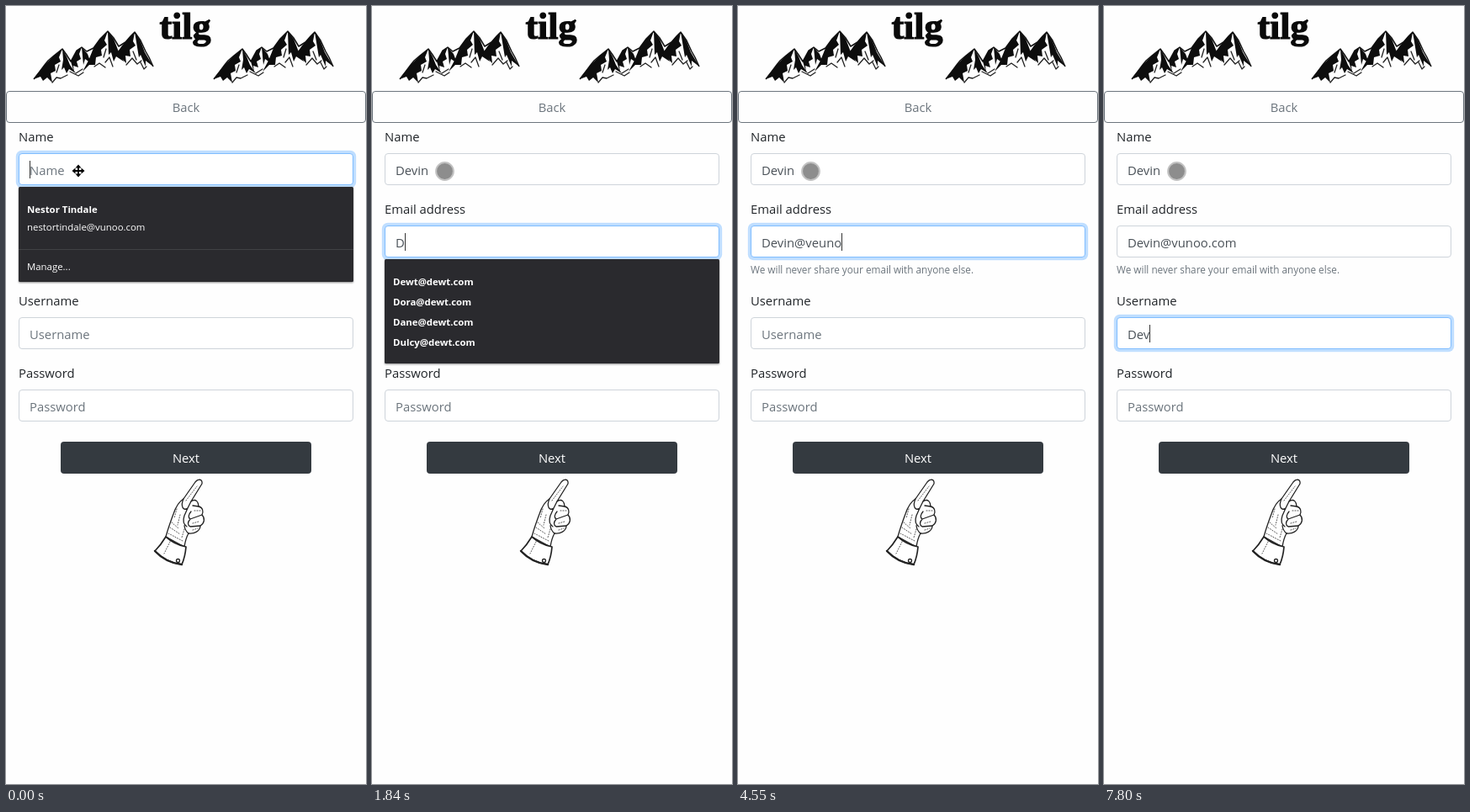
An HTML page that plays this animation: 428 by 925 pixels, repeating every 8 s.

```html
<!DOCTYPE html>
<html lang="en">
<head>
<meta charset="utf-8">
<title>Sign-up form</title>
<style>
  html, body { margin: 0; width: 100%; height: 100%; overflow: hidden; background: #fefefe; }
  svg { display: block; width: 100%; height: 100%; }
  text { font: 14.8px "Open Sans", "Noto Sans", sans-serif; fill: #212529; white-space: pre; }
  .muted { fill: #6c757d; }
  .value { fill: #495057; }
  .help { font-size: 11.75px; fill: #6c757d; }
  .menu text { font-size: 11.4px; fill: #fff; }
  .menu .strong { font-weight: 700; }
  .brand { font: 700 44px "Liberation Serif", serif; fill: #0a0a0a; stroke: #0a0a0a; stroke-width: 1.2; }
  .ink { fill: none; stroke: #222; stroke-width: 1.3; stroke-linejoin: round; stroke-linecap: round; }
  .hidden { display: none; }
</style>
</head>
<body>
<svg id="stage" viewBox="0 0 428 925">
  <defs>
    <filter id="soft" x="-5%" y="-10%" width="110%" height="130%">
      <feDropShadow dx="0" dy="1" stdDeviation="1" flood-opacity=".45"/>
    </filter>
    <g id="range">
      <path fill="none" stroke="#111" stroke-width="1.5" stroke-linejoin="round"
        d="M33 87L40 78 46 70 50 65 57 59 67 51 72 58 77 66 84 53 90 49 96 54 104 50 112 39 121 30 128 38 134 48 142 43 148 36 153 31 160 41 166 54 170 61 175 72"/>
      <g fill="#0d0d0d">
        <path d="M33 87L46 70 57 59 67 51 63 61 65 66 58 70 59 77 53 80 55 91 49 85 44 89 41 84Z"/>
        <path d="M67 51L72 60 76 70 83 80 75 75 72 80 69 73 66 76 68 64Z"/>
        <path d="M77 66L84 53 90 49 87 57 89 63 84 66 86 73 80 71 81 79Z"/>
        <path d="M90 49L97 57 101 68 94 63 92 70Z"/>
        <path d="M91 78L98 65 104 50 112 39 121 30 117 41 120 46 113 52 114 59 107 61 106 70 99 70Z"/>
        <path d="M121 30L128 39 133 52 140 66 131 60 128 66 125 55 122 58Z"/>
        <path d="M131 57L138 47 148 36 153 31 151 42 154 47 147 52 148 60 142 59 143 68 137 62Z"/>
        <path d="M153 31L160 42 165 55 175 72 166 65 166 72 160 58 158 61Z"/>
      </g>
      <path class="ink" d="M55 91L60 85 65 86 73 82 M76 78L86 83 92 79 M83 80L91 75 M105 72L111 68 118 73 M116 61L119 51 M118 67L123 61 127 72 M143 70L150 62 156 69 161 65 M151 54L155 64 M60 79L63 70 M160 67L164 75 167 72"/>
    </g>
  </defs>

  <use href="#range"/>
  <use href="#range" x="214"/>
  <text class="brand" x="213" y="39" text-anchor="middle">tilg</text>

  <rect x=".5" y="101.5" width="427" height="37" rx="3.5" fill="none" stroke="#6c757d"/>
  <text class="muted" x="214" y="126" text-anchor="middle">Back</text>
  <g id="form"></g>
  <text class="help" x="15" y="318">We will never share your email with anyone else.</text>
  <rect x="65" y="518" width="298" height="38" rx="4" fill="#343a40"/>
  <text x="214" y="543" text-anchor="middle" style="fill:#fff">Next</text>

  <g class="ink">
    <path fill="#fff" d="M190 631C193 620 196 612 199 604C202 595 206 589 211 586L225 566C228 562 234 562 233 568L220 589C226 585 229 590 229 595C234 596 235 601 233 605C237 609 236 615 231 618C231 624 224 628 217 627C214 632 213 637 212 643Z"/>
    <path fill="#fff" stroke-width="1.7" d="M190 631Q200 640 214 643Q213 655 209 664Q191 662 177 648Q184 641 190 631Z"/>
    <path d="M211 586C207 595 211 601 216 597L220 589 M216 597L212 606 Q209 615 215 619 M220 601Q215 607 219 610L233 605 M219 610Q214 616 219 619L231 618 M222 594L229 595 M217 627Q213 624 212 618"/>
    <path stroke-width="2.4" d="M177 648Q190 662 209 664"/>
    <path stroke-width=".8" stroke-dasharray="1 2" d="M193 627L210 636 M195 620L207 628 M197 614L205 621 M203 598L200 609 M207 605L204 617 M212 622L209 632 M214 588L227 571 M224 600L231 600 M222 615L229 613 M222 623L228 621 M195 637L188 651"/>
    <circle cx="204.500" cy="659.500" r="2"/>
  </g>

  <g id="menu" class="menu"></g>
  <line id="caret" stroke="#333" stroke-width="1"/>
  <g id="cross">
    <path id="arrows" stroke="#fff" stroke-width="2" paint-order="stroke"
      d="M86 188.500l3.500 4h-2.500v2.500h2.500v-2.500l4 3.500l-4 3.500v-2.500h-2.500v2.500h2.500l-3.500 4l-3.500-4h2.500v-2.500h-2.500v2.500l-4-3.500l4-3.500v2.500h2.500v-2.500h-2.500Z"/>
  </g>
  <circle id="touch" cx="86.500" cy="196.500" r="10.400" fill="#8d8d8d" stroke="#c2c2c2" stroke-width="2"/>
</svg>
<script>
const LOOP = 8000;
const LEFT = 28.5;
const byId = id => document.getElementById(id);
const menu = byId('menu'), caret = byId('caret');

function add(parent, tag, attrs, text) {
  const el = document.createElementNS('http://www.w3.org/2000/svg', tag);
  for (const key in attrs) el.setAttribute(key, attrs[key]);
  if (text) el.textContent = text;
  return parent.appendChild(el);
}

// Saved entries are suggested when they begin with the typed text.
const fields = [
  { label: 'Name', y: 175, saved: ['Devon', 'Dora', 'Dane', 'Dulcy'] },
  { label: 'Email address', hint: 'Enter email', y: 261,
    saved: ['Dewt@dewt.com', 'Dora@dewt.com', 'Dane@dewt.com', 'Dulcy@dewt.com'] },
  { label: 'Username', y: 370, saved: ['Dora', 'Dane', 'Dulcy', 'Dorrit', 'Dustle', 'Dipple'] },
  { label: 'Password', y: 456, saved: [] }
];

for (const f of fields) {
  const form = byId('form');
  add(form, 'text', { x: 15, y: f.y - 14 }, f.label);
  f.ring = add(form, 'rect', { x: 11.8, y: f.y - 3.2, width: 404.4, height: 44.4, rx: 7, fill: '#bfdeff' });
  f.box = add(form, 'rect', { x: 15.5, y: f.y + .5, width: 397, height: 37, rx: 3.5, fill: '#fff' });
  f.text = add(form, 'text', { x: 28, y: f.y + 26 });
}

// Each entry: start time, field index, typed text.
const typing = [
  [0, 0, ''], [430, 0, 'D'], [580, 0, 'De'], [700, 0, 'Dev'], [850, 0, 'Devi'], [1160, 0, 'Devin'],
  [1280, 1, ''], [1840, 1, 'D'], [2430, 1, 'De'], [2550, 1, 'Dev'], [2700, 1, 'Devi'],
  [2850, 1, 'Devin'], [3240, 1, 'Devin@'], [3760, 1, 'Devin@v'], [3880, 1, 'Devin@veu'],
  [4000, 1, 'Devin@veun'], [4280, 1, 'Devin@veuno'], [4400, 1, 'Devin@veunoo'],
  [4550, 1, 'Devin@veuno'], [4700, 1, 'Devin@veun'], [4850, 1, 'Devin@veu'], [4970, 1, 'Devin@ve'],
  [5250, 1, 'Devin@vu'], [5530, 1, 'Devin@vuno'], [5680, 1, 'Devin@vunoo'], [5800, 1, 'Devin@vunoo.'],
  [5950, 1, 'Devin@vunoo.co'], [6230, 1, 'Devin@vunoo.com'],
  [6350, 2, ''], [7680, 2, 'D'], [7800, 2, 'Dev']
];
const idle = [[0, 430], [2970, 3490], [7280, 7680]];
const within = (t, [from, to]) => t >= from && t < to;

function panel(y, height) {
  menu.replaceChildren();
  add(menu, 'rect', { x: 15, y, width: 398, height, rx: 1.5, fill: '#292a2d', filter: 'url(#soft)' });
}

function drawMenu(f, typed) {
  const y = f.y + 40;
  const matches = typed ? f.saved.filter(s => s.startsWith(typed)) : [];
  menu.replaceChildren();
  if (!typed && f === fields[0]) {
    panel(y, 113);
    add(menu, 'text', { x: 25, y: y + 31, class: 'strong' }, 'Nestor Tindale');
    add(menu, 'text', { x: 25, y: y + 52 }, 'nestortindale@vunoo.com');
    add(menu, 'rect', { x: 15, y: y + 74, width: 398, height: 1, fill: '#414245' });
    add(menu, 'text', { x: 25, y: y + 99 }, 'Manage...');
  } else if (matches.length) {
    panel(y, 28 + 24 * matches.length);
    matches.forEach((s, i) => add(menu, 'text', { x: 25, y: y + 31 + 24 * i, class: 'strong' }, s));
  }
}

function drawFields(step) {
  const values = ['', '', '', ''];
  for (let i = 0; i <= step; i++) values[typing[i][1]] = typing[i][2];
  const active = typing[step][1];
  fields.forEach((f, i) => {
    const on = i === active;
    f.ring.classList.toggle('hidden', !on);
    f.box.setAttribute('stroke', on ? '#80bdff' : '#ced4da');
    f.text.setAttribute('class', values[i] ? 'value' : 'muted');
    f.text.textContent = values[i] || f.hint || f.label;
  });
  const f = fields[active];
  const x = LEFT + (values[active] ? Math.round(f.text.getComputedTextLength()) : 0);
  const ends = { x1: x, x2: x, y1: f.y + 9, y2: f.y + 30 };
  for (const key in ends) caret.setAttribute(key, ends[key]);
  drawMenu(f, values[active]);
}

let shown = -1;
function render(t) {
  let step = typing.length - 1;
  while (typing[step][0] > t) step--;
  if (step !== shown) drawFields(shown = step);
  const resting = idle.some(span => within(t, span));
  byId('cross').classList.toggle('hidden', !resting);
  byId('touch').classList.toggle('hidden', resting);
  caret.classList.toggle('hidden', within(t, [6750, 7280]));
}

const start = performance.now();
function tick() {
  render((performance.now() - start) % LOOP);
  requestAnimationFrame(tick);
}
tick();
</script>
</body>
</html>
```
